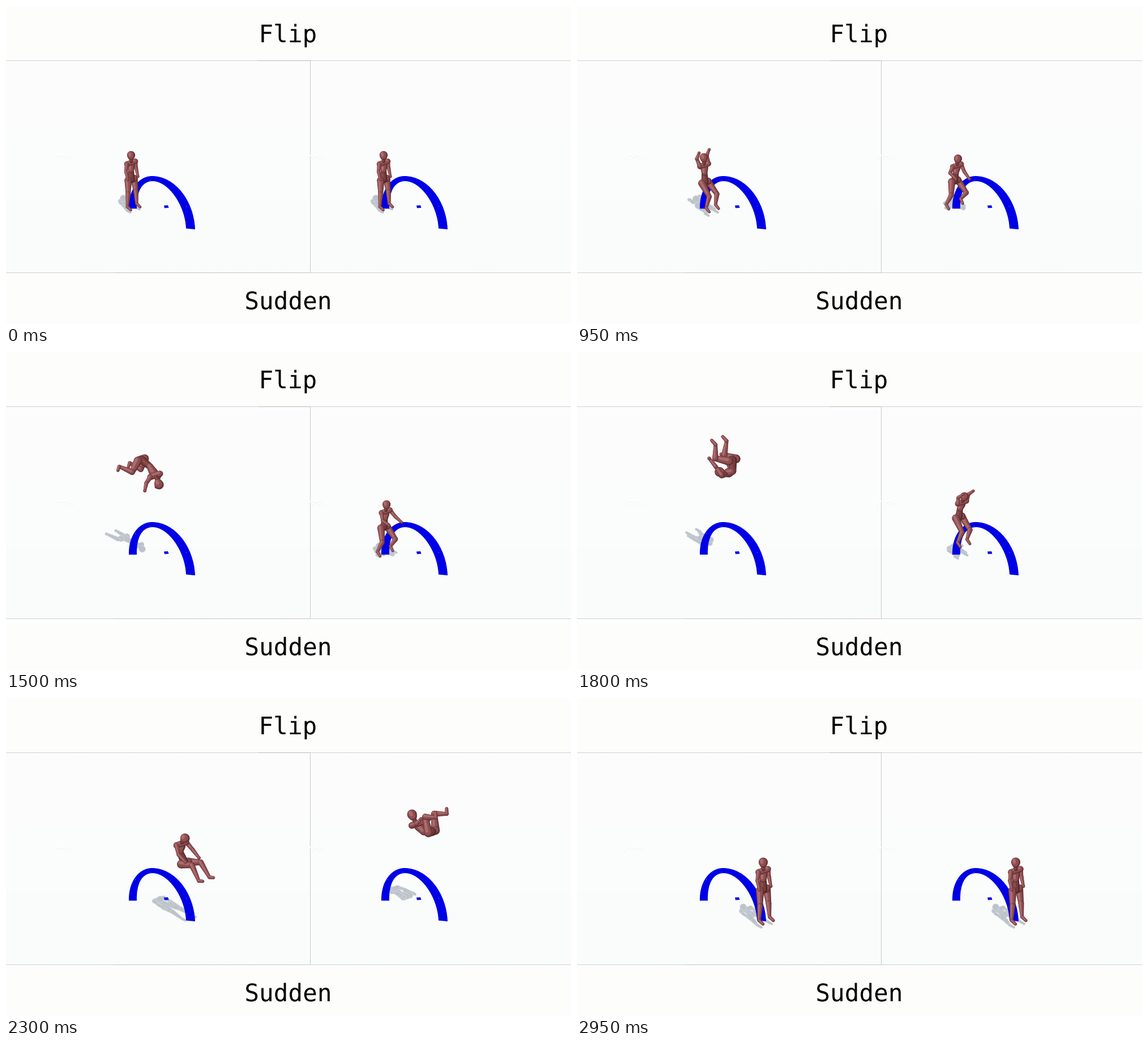
A matplotlib script that plays this animation: 998x561 px, repeating every 3000 ms.

```python
import numpy as np
import matplotlib.pyplot as plt
from matplotlib.animation import FuncAnimation
from matplotlib.collections import PolyCollection
from matplotlib.patches import PathPatch, Polygon, Rectangle
from matplotlib.path import Path
from matplotlib.textpath import TextPath
from matplotlib.transforms import Affine2D

W, H = 998, 561
STEP, FRAMES = 50, 60
PANEL_SHIFT = 446
SPLIT = 537.5
BLUE = "#0000e6"

plt.rcParams["font.family"] = "DejaVu Sans Mono"
fig = plt.figure(figsize=(W / 100, H / 100), dpi=100, facecolor="#fdfdfc")
ax = fig.add_axes([0, 0, 1, 1])

# Screen directions of forward, sideways and up
BASIS = np.array([(.71, .38), (.74, -.25), (0, -.84)])


def curve(*values):
    """Monotone cubic through evenly spaced key values."""
    v = np.array(values, float)
    a, b = np.diff(v)[:-1], np.diff(v)[1:]
    m = np.zeros_like(v)
    m[1:-1] = np.where(a * b > 0, 2 * a * b / np.where(a * b > 0, a + b, 1), 0)

    def at(p):
        i = min(int(p), len(v) - 2)
        u = p - i
        e = u * u * (3 - 2 * u)
        return (v[i] * (1 - e) + v[i + 1] * e
                + u * (1 - u) * ((1 - u) * m[i] - u * m[i + 1]))
    return at


def bump(p, centre):
    return np.exp(-((p - centre) / .5) ** 2)


# Phases: stand, stride, crouch, tuck, apex, open, sit, stand
root_x = curve(221, 221, 226, 239, 260, 311, 319, 329)
root_y = curve(306, 308, 311, 190, 180, 249, 322, 338)
turn = curve(0, 10, -3, 118, 175, 290, 383, 360)
hip_bend = curve(5, 31, 45, 95, 137, 98, 103, 5)
knee_bend = curve(5, 53, 60, 65, 119, 73, 70, 5)
arm_lift = curve(0, 0, 200, 108, 105, 60, 43, 0)


def left_phase(t):
    return np.interp(t, [0, 450, 950, 1500, 1670, 2100, 2500, 2950], range(8))


def right_phase(t):
    return np.interp(t, [0, 450, 1500, 1740, 1970, 2100, 2340, 2520, 2950],
                     [0, 1, 1.3, 2, 3, 4, 5, 6, 7])


def limb(start, *bones):
    """Chain of (length, angle, sideways) bones; 0 degrees hangs down."""
    pts = [np.array(start, float)]
    for length, deg, side in bones:
        a = np.radians(deg)
        pts.append(pts[-1] + (length * np.sin(a), side, -length * np.cos(a)))
    return pts


def skeleton(p):
    """Limbs in body space: forward, sideways, up from the pelvis."""
    lean = turn(p)
    curl = 55 * np.sin(np.pi * np.clip((p - 2) / 5, 0, 1))
    chest = lean + curl / 2
    step = 24 * bump(p, 1)
    swing = 22 * bump(p, 1) + 35 * bump(p, 6)
    elbow = 15 + 50 * bump(p, 1) - 60 * bump(p, 2) + 17 * bump(p, 6)
    spine = limb((0, 0, 0), (19, 180 - lean + curl / 2, 0), (19, 180 - chest, 0),
                 (13, 180 - lean - curl, 0))
    arms, legs = [], []
    for s in (1, -1):
        thigh = hip_bend(p) + s * step - lean
        shin = thigh - knee_bend(p) - 1.3 * s * step
        legs.append(limb((0, 7 * s, 0), (27, thigh, 2 * s), (26, shin, 2 * s),
                         (9, shin + 70, 0)))
        upper = arm_lift(p) + s * swing - chest
        arms.append(limb(spine[2] + (0, 10 * s, 0) - .15 * (spine[2] - spine[1]),
                         (15, upper, 2 * s),
                         (16, upper + elbow - 1.3 * s * swing, 0)))
    return spine, arms, legs


def bones(p):
    """Capsules from back to front: two ends, two radii, tone."""
    spine, arms, legs = skeleton(p)
    pelvis, waist, neck, head = spine

    def arm(a):
        return [(a[0], a[1], 3.8, 2.9, 0), (a[1], a[2], 3.2, 2.2, 0),
                (a[2], a[2], 2.6, 2.6, 0)]

    def leg(g):
        return [(g[0], g[1], 6.4, 4.2, 0), (g[1], g[2], 4.5, 2.6, 0),
                (g[2], g[3], 2.8, 2.4, 0)]

    chest = .6 * neck + .4 * waist
    return (arm(arms[0]) + leg(legs[0])
            + [(legs[0][0], legs[1][0], 6.4, 6.4, 0), (waist, pelvis, 5, 6.4, 1),
               (chest, waist, 7, 5, 0), (arms[0][0], arms[1][0], 4.8, 4.8, 0)]
            + leg(legs[1])
            + [(head, neck, 4.2, 3, 1), (head, .75 * head + .25 * neck, 7.2, 6, 0)]
            + arm(arms[1]))


# Layers: radius factor, offset toward the light, colours per tone
LAYERS = [(1.0, 0.0, ("#673336", "#502829")),
          (0.8, 0.14, ("#8e4e50", "#733c3d")),
          (0.36, 0.36, ("#a96d6f", "#884c4d"))]
COLORS = [tones[b[4]] for b in bones(0) for _, _, tones in LAYERS]


def capsule(p, q, r1, r2):
    d = np.hypot(*(q - p))
    a = np.arctan2(q[1] - p[1], q[0] - p[0])
    b = np.arccos(np.clip((r1 - r2) / max(d, 1e-6), -1, 1))
    back = np.linspace(a + b, a + 2 * np.pi - b, 14)
    front = np.linspace(a - b, a + b, 14)
    return np.vstack([p + r1 * np.c_[np.cos(back), np.sin(back)],
                      q + r2 * np.c_[np.cos(front), np.sin(front)]])


class Figure:
    def __init__(self, phase, dx):
        self.phase = phase
        where = Affine2D().translate(dx, 0) + ax.transData
        self.shadow = PolyCollection([], facecolors="#bcc3ca", edgecolors="#d5dade",
                                     linewidths=.4, transform=where, zorder=3)
        self.body = PolyCollection([], facecolors=COLORS, edgecolors="none",
                                   transform=where, zorder=6)
        ax.add_collection(self.shadow, autolim=False)
        ax.add_collection(self.body, autolim=False)

    def show(self, time):
        p = self.phase(time)
        root = np.array([root_x(p), root_y(p)])
        far = root[0] - 220
        ground = 358 + .38 * far
        lift = ground - root[1]
        near = 1 + .0011 * far
        size = near + .001 * max(0, lift - 52)
        # The shadow keeps the floor directions and slides with height
        slide = np.array([-.12 - .0014 * far, -.17 - .0006 * far])
        flat = np.vstack([BASIS[:2], slide])
        foot = np.array([root[0], ground]) + slide * lift / .84
        body, shade = [], []
        for a, b, r1, r2, _ in bones(p):
            shade.append(capsule(foot + near * a @ flat, foot + near * b @ flat,
                                 .8 * r1, .8 * r2))
            a, b = root + size * a @ BASIS, root + size * b @ BASIS
            r1, r2 = r1 * size, r2 * size
            for k, off, _ in LAYERS:
                body.append(capsule(a - off * r1, b - off * r2, r1 * k, r2 * k))
        self.body.set_verts(body)
        self.shadow.set_verts(shade)


def hoop(dx):
    pts = np.array([(217, 357.5), (216, 325), (234, 300), (258, 300),
                    (298, 300), (332, 343), (334, 394), (318, 392.5),
                    (316, 350), (286, 309), (259, 309),
                    (240, 309), (230, 328), (231, 357.5), (217, 357.5)])
    c = [Path.CURVE4] * 6
    codes = [Path.MOVETO] + c + [Path.LINETO] + c + [Path.CLOSEPOLY]
    ax.add_patch(PathPatch(Path(pts + (dx, 0), codes), fc=BLUE, ec="none", zorder=4))
    tile = np.array([(279, 352), (286, 351.5), (287.5, 356), (280, 356.5)])
    ax.add_patch(Polygon(tile + (dx, 0), fc=BLUE, ec="none", zorder=4))
    ax.plot(np.array([228, 255, 318.5]) + dx, [320, 306.5, 353], "o",
            ms=.9, mew=0, color="#7f86f2", zorder=5)


def cloud(dx):
    clip = Rectangle((SPLIT if dx else 0, 96), W, 374, transform=ax.transData)
    u = np.linspace(0, 1, 40)
    for x0, w, y0, h in ((83, 28, 270, 7), (97, 21, 268, 5)):
        for drop, col in ((1, "#f1f2f3"), (0, "#ffffff")):
            ax.plot(x0 + w * u + dx, y0 + drop - h * np.sin(np.pi * u ** .8), color=col,
                    lw=1.3, zorder=2, clip_path=clip)


def title(s, x, base):
    glyphs = TextPath((0, 0), s, size=42.7)
    box = glyphs.get_extents()
    place = Affine2D().translate(-(box.x0 + box.x1) / 2, 0).scale(1, -1).translate(x, base)
    ax.add_patch(PathPatch(place.transform_path(glyphs), fc="black", ec="none", zorder=8))


# Still scenery
fade = np.linspace(0, 1, 64)[:, None, None]
sky = np.array([253, 253, 252]) * (1 - fade) + np.array([250, 252, 253]) * fade
ax.imshow(sky / 255, extent=(0, W, 470, 96), aspect="auto",
          interpolation="bilinear", zorder=0)
for xs, ys, col in (((0, W), (95.5, 95.5), "#cdd0d2"),
                    ((446, SPLIT), (95.5, 95.5), "#b6b9bb"),
                    ((0, W), (469.5, 469.5), "#cdd0d2"),
                    ((190, SPLIT), (469.5, 469.5), "#c2c5c8"),
                    ((SPLIT, SPLIT), (96, 470), "#c6c9cc")):
    ax.plot(xs, ys, color=col, lw=.72, zorder=1, solid_capstyle="butt")
for shift in (0, PANEL_SHIFT):
    hoop(shift)
    cloud(shift)
title("Flip", 499, 64)
title("Sudden", 498, 535)

ax.set_xlim(0, W)
ax.set_ylim(H, 0)
ax.axis("off")

figures = [Figure(left_phase, 0), Figure(right_phase, PANEL_SHIFT)]


def draw(n):
    for f in figures:
        f.show(n * STEP)
    return [c for f in figures for c in (f.shadow, f.body)]


anim = FuncAnimation(fig, draw, frames=FRAMES, interval=STEP, repeat=True,
                     repeat_delay=0, blit=False)
plt.show()
```
